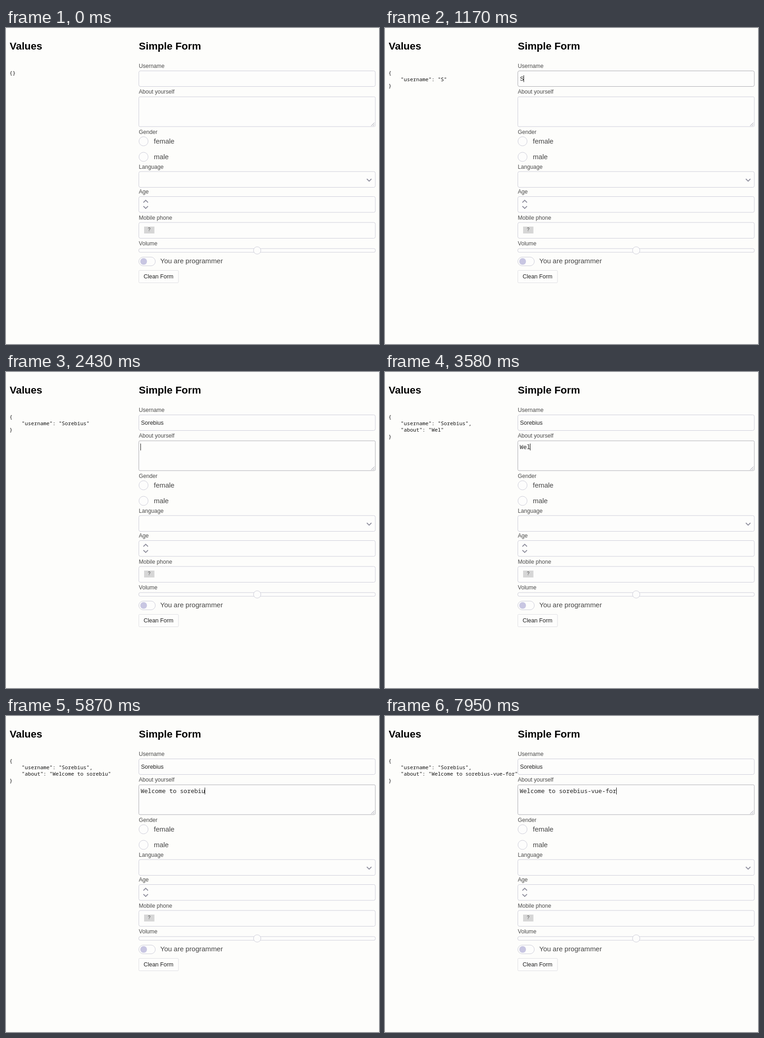
Write an HTML page that moves like this. It is 813 px wide and 689 px high and loops after 8 s.

```html
<!DOCTYPE html>
<html lang="en">
<head>
<meta charset="utf-8">
<title>Simple Form</title>
<style>
  html, body { margin: 0; width: 100%; height: 100%; overflow: hidden; background: #fdfdfb; }
  svg { display: block; font-family: "Liberation Sans", Arial, sans-serif; }
  text { white-space: pre; }
  .title { font-size: 22.4px; font-weight: bold; fill: #000; }
  .label { font-size: 12.13px; fill: #4a4a4a; }
  .option { font-size: 14.93px; fill: #444; }
  .control { font-size: 12.44px; fill: #222; }
  .mono { font-family: "Noto Sans Mono", "DejaVu Sans Mono", monospace; fill: #111; }
  .json { font-size: 11.2px; }
  .area { font-size: 13px; fill: #222; }
  .box { fill: #fdfdfc; stroke: #cdcdd9; }
  .icon { fill: none; stroke: #8e8e9c; stroke-width: 1.9; }
</style>
</head>
<body>
<svg id="stage" width="813" height="689" viewBox="0 0 813 689"></svg>
<script>
const LOOP = 8000, FOCUS_NAME = 520, FOCUS_ABOUT = 2330, FADE = 100;
const stage = document.getElementById("stage");

function add(tag, attributes, content = "") {
  const node = document.createElementNS("http://www.w3.org/2000/svg", tag);
  for (const key in attributes) node.setAttribute(key, attributes[key]);
  node.textContent = content;
  return stage.appendChild(node);
}
const text = (style, x, y, content) => add("text", { class: style, x, y }, content);
const box = (x, y, width, height, rx = 3.5) => add("rect", { class: "box", x, y, width, height, rx });
const circle = (cx, cy, r) => add("circle", { class: "box", cx, cy, r });
const icon = d => add("path", { class: "icon", d });

text("title", 8, 47, "Values");
text("title", 289.5, 47, "Simple Form");

const labels = { Username: 86.5, "About yourself": 143, Gender: 230.5, Language: 306.5,
                 Age: 361, "Mobile phone": 417.5, Volume: 474 };
for (const name in labels) text("label", 289.5, labels[name], name);

const nameBox = box(289.5, 93.5, 515.5, 34);
const aboutBox = box(289.5, 150, 515.5, 65, 2.5);
icon("M796 213.5l7-7M800 213.5l3-3").style.strokeWidth = 1;

circle(299.8, 247, 10);
text("option", 322.3, 252, "female");
circle(299.8, 281, 10);
text("option", 322.3, 286, "male");

box(289.5, 313, 515.5, 34.5);
icon("M786.5 329l5 5 5-5");
box(289.5, 367.5, 515.5, 34.5);
icon("M299.5 380.5l5-5 5 5M299.5 388.5l5 5 5-5");
box(289.5, 424, 515.5, 34.5);
add("rect", { x: 301, y: 433, width: 22.5, height: 15, fill: "#d6d6d6" });
text("label", 309.2, 443, "?").style.fontSize = "10px";

box(289.5, 481, 515.5, 8, 3);
circle(547.5, 485, 8);
box(289.5, 499.5, 36, 19, 9.5);
add("circle", { cx: 300, cy: 509, r: 7.3, fill: "#c8c6e2" });
text("option", 336.3, 513.2, "You are programmer");
box(289.5, 528.5, 86.5, 27, 2).style.stroke = "#dfdfe4";
text("control", 300, 546, "Clean Form");

const json = [0, 1, 2, 3].map(row => text("mono json", 7.5, 102 + row * 14.2, ""));
const nameText = text("control", 294.3, 115, "");
const aboutText = text("mono area", 293.5, 168, "");
const caret = add("rect", { width: 1, height: 15, fill: "#111" });

const username = { full: "Sorebius", times: [1070, 1380, 1530, 1610, 1700, 1780, 1970, 2070] };
const about = {
  full: "Welcome to sorebius-vue-for",
  times: [2870, 3100, 3580, 3780, 3880, 4070, 4170, 4520, 4670, 4780, 4880, 5180, 5270, 5420,
          5500, 5570, 5650, 5870, 5930, 6230, 6750, 7000, 7200, 7420, 7770, 7860, 7950]
};
const typed = (field, t) => field.full.slice(0, field.times.filter(at => at <= t).length);

function borderColor(focus) {
  const mix = (from, to) => Math.round(from + (to - from) * focus);
  return `rgb(${mix(205, 172)},${mix(205, 172)},${mix(217, 178)})`;
}

function draw(t) {
  const values = {};
  const nameValue = typed(username, t), aboutValue = typed(about, t);
  if (nameValue) values.username = nameValue;
  if (aboutValue) values.about = aboutValue;
  const lines = JSON.stringify(values, null, 4).split("\n");
  json.forEach((row, i) => row.textContent = lines[i] || "");
  nameText.textContent = nameValue;
  aboutText.textContent = aboutValue;

  const shift = Math.min(1, Math.max(0, (t - FOCUS_ABOUT) / FADE));
  nameBox.style.stroke = borderColor(t < FOCUS_NAME ? 0 : 1 - shift);
  aboutBox.style.stroke = borderColor(shift);

  const inAbout = t >= FOCUS_ABOUT;
  const active = inAbout ? aboutText : nameText;
  const end = Number(active.getAttribute("x")) + active.getComputedTextLength();
  caret.setAttribute("x", Math.floor(end));
  caret.setAttribute("y", inAbout ? 156 : 103);
  caret.style.display = t < FOCUS_NAME ? "none" : "";
}

const start = performance.now();
function frame() {
  draw((performance.now() - start) % LOOP);
  requestAnimationFrame(frame);
}
frame();
</script>
</body>
</html>
```
